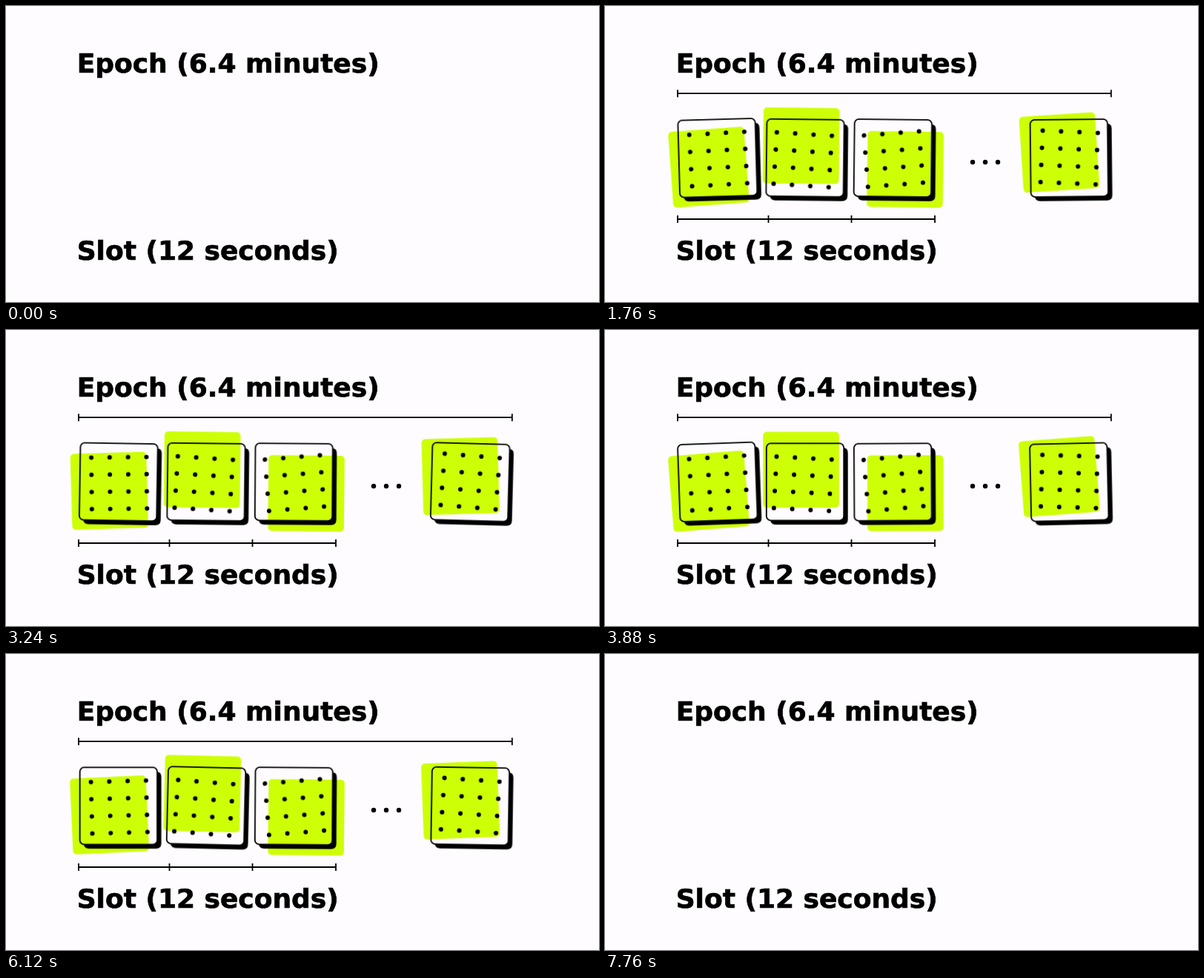
Animation, 800 px wide and 400 px high, one loop 7920 ms. Source, as an HTML page:

```html
<!DOCTYPE html>
<html lang="en">
<head>
<meta charset="utf-8">
<title>Epoch and slots</title>
<style>
html, body { margin: 0; width: 100%; height: 100%; overflow: hidden; background: #fefcff; }
svg { position: absolute; left: 0; top: 0; }
text { font: bold 36px "DejaVu Sans", sans-serif; stroke: #000; stroke-width: .7; }
.tint { fill: #cdff06; }
.line { fill: none; stroke: #000; stroke-width: 1.8; }
.dots { fill: none; stroke: #000; stroke-width: 6; stroke-linecap: round; stroke-dasharray: 0 24.8; }
.ellipsis { stroke-width: 6.4; stroke-dasharray: 0 17; }

.rule { clip-path: inset(0 100% 0 0); }
.epoch { left: 96px; top: 112px; animation: epoch 7920ms infinite; }
.slot { left: 96px; top: 282px; animation: slot 7920ms infinite; }
.pop { animation: pop 7920ms calc(var(--i) * 110ms) infinite backwards; }
.sway { animation: 7920ms cubic-bezier(.37, 0, .63, 1) infinite; }
.s1 { animation-name: sway1; }
.s2 { animation-name: sway2; }
.s3 { animation-name: sway3; }
.s4 { animation-name: sway4; }

@keyframes epoch {
  0%, .5% { clip-path: inset(0 100% 0 0); animation-timing-function: cubic-bezier(.25, 1, .5, 1); }
  17.5% { clip-path: inset(0); }
  87.1% { clip-path: inset(0); animation-timing-function: cubic-bezier(.5, 0, .75, 0); }
  97.7%, 100% { clip-path: inset(0 100% 0 0); }
}
@keyframes slot {
  0%, .5% { clip-path: inset(0 100% 0 0); animation-timing-function: cubic-bezier(.25, 1, .5, 1); }
  10.1% { clip-path: inset(0); }
  87.1% { clip-path: inset(0); animation-timing-function: cubic-bezier(.5, 0, .75, 0); }
  97.7%, 100% { clip-path: inset(0 100% 0 0); }
}
@keyframes pop {
  0%, .5% { transform: scale(0); animation-timing-function: cubic-bezier(.33, 1, .68, 1); }
  10.7% { transform: scale(1); }
  88.4% { transform: scale(1); animation-timing-function: cubic-bezier(.32, 0, .67, 0); }
  93.8%, 100% { transform: scale(0); }
}
@keyframes sway1 {
  0%, 100% { transform: rotate(0deg); }
  12.6% { transform: rotate(1.6deg); }
  25.3% { transform: rotate(-2.1deg); }
  37.9% { transform: rotate(1.4deg); }
  50.5% { transform: rotate(-2.1deg); }
  61.9% { transform: rotate(1.6deg); }
  77.3% { transform: rotate(0deg); }
  88.4% { transform: rotate(-.8deg); }
}
@keyframes sway2 {
  0%, 12.6%, 100% { transform: rotate(0deg); }
  32.8% { transform: rotate(1.35deg); }
  48.5% { transform: rotate(0deg); }
  61% { transform: rotate(1.35deg); }
  69.4% { transform: rotate(.7deg); }
  77.3% { transform: rotate(1.35deg); }
  88.4% { transform: rotate(.3deg); }
}
@keyframes sway3 {
  0%, 100% { transform: rotate(0deg); }
  12% { transform: rotate(1.5deg); }
  32.8% { transform: rotate(-.3deg); }
  40.4% { transform: rotate(.4deg); }
  49% { transform: rotate(-.3deg); }
  60.6% { transform: rotate(.6deg); }
  69.4% { transform: rotate(0deg); }
  77.3% { transform: rotate(.4deg); }
  88.4% { transform: rotate(0deg); }
}
@keyframes sway4 {
  0%, 100% { transform: rotate(0deg); }
  12% { transform: rotate(2deg); }
  22.5% { transform: rotate(-.6deg); }
  32.8%, 37.9% { transform: rotate(2deg); }
  50% { transform: rotate(-1.3deg); }
  60.6% { transform: rotate(2deg); }
  77.3% { transform: rotate(.9deg); }
  88.4% { transform: rotate(.3deg); }
}
</style>
</head>
<body>
<svg width="800" height="400" viewBox="0 0 800 400">
  <defs>
    <rect id="tint" class="tint" x="-51.3" y="-51.3" width="102.6" height="102.6" rx="5"/>
    <g id="card">
      <path d="M52-46Q57.7-46 57.7-39V50.5Q57.7 57.7 50.5 57.7H-40Q-46 57.7-47 52H46Q52 52 52 46Z"/>
      <rect class="line" x="-52.2" y="-52.2" width="104.4" height="104.4" rx="6"/>
    </g>
    <path id="dots" class="dots" d="M-37.2-34.8h74.6M-37.2-11.6h74.6M-37.2 11.6h74.6M-37.2 34.8h74.6"/>
  </defs>

  <text x="95.7" y="90">Epoch (6.4 minutes)</text>
  <text x="95.7" y="343">Slot (12 seconds)</text>

  <g transform="translate(151.8 205.3)"><g class="pop" style="--i:0"><g class="sway s1">
    <use href="#tint" transform="translate(-12.3 12.2) rotate(-2.6)"/>
    <use href="#card"/>
    <use href="#dots" transform="translate(.9 1.5) rotate(-1.6)"/>
  </g></g></g>

  <g transform="translate(270 205.3)"><g class="pop" style="--i:1"><g class="sway s2">
    <use href="#tint" transform="translate(-5.5 -16.5)"/>
    <use href="#card"/>
    <use href="#dots" transform="translate(-3.2 2.5) rotate(3)"/>
  </g></g></g>

  <g transform="translate(388.3 205.5)"><g class="pop" style="--i:2"><g class="sway s3">
    <use href="#tint" transform="translate(16.9 15.1) rotate(.2)"/>
    <use href="#card"/>
    <use href="#dots" transform="translate(.9 1.3) rotate(-5)"/>
  </g></g></g>

  <g transform="translate(513 211)"><g class="pop" style="--i:2.5">
    <path class="dots ellipsis" d="M-17 0h34.2"/>
  </g></g>

  <g transform="translate(626.2 205.5)"><g class="pop" style="--i:3"><g class="sway s4">
    <use href="#tint" transform="translate(-13.3 -7.7) rotate(-3.1)"/>
    <use href="#card"/>
    <use href="#dots" transform="translate(0 -.8) rotate(3)"/>
  </g></g></g>
</svg>

<svg class="rule epoch" width="588" height="12" viewBox="96 112 588 12">
  <path class="line" d="M98 118.2H682.8M98 113.2v10M682.8 113.2v10"/>
</svg>
<svg class="rule slot" width="351" height="12" viewBox="96 282 351 12">
  <path class="line" d="M98 288H445M98 283v10M220.5 283v10M332.5 283v10M445 283v10"/>
</svg>
</body>
</html>
```
